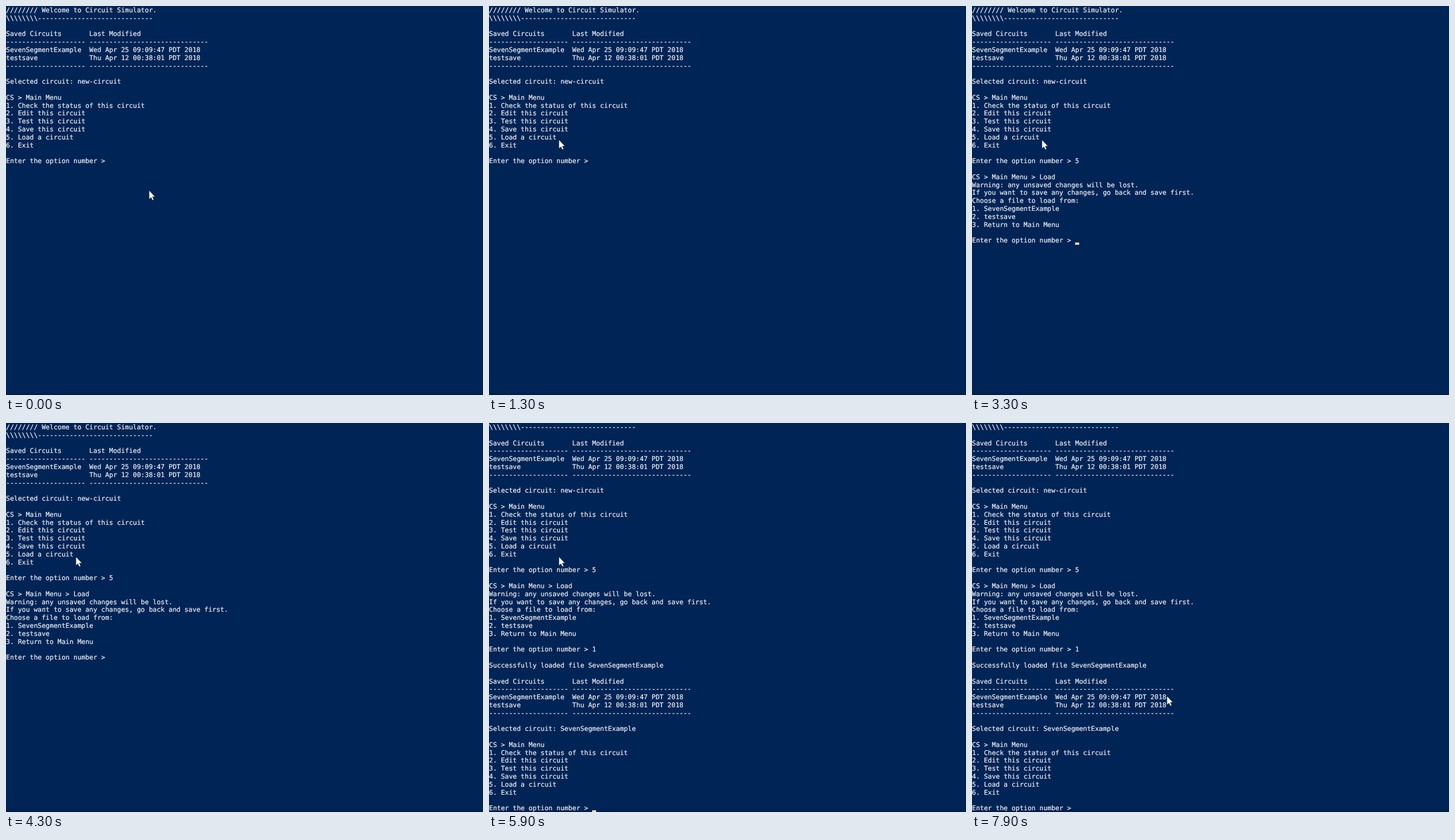
Animation, 828 px wide and 676 px high, one loop 8000 ms. Source, as an HTML page:

```html
<!DOCTYPE html>
<html lang="en">
<head>
<meta charset="utf-8">
<title>Circuit Simulator</title>
<style>
  html, body { margin: 0; width: 100%; height: 100%; overflow: hidden; background: #012456; }
  #stage { position: relative; width: 828px; height: 676px; overflow: hidden; background: #012456; }
  #edge { position: absolute; left: 0; bottom: 0; width: 100%; height: 3px; background: linear-gradient(#01214f, #011b42); }
  #screen {
    position: absolute; left: 0; top: 1px; margin: 0;
    font: 11.44px/13.79px "DejaVu Sans Mono", monospace;
    font-variant-ligatures: none; text-rendering: geometricPrecision;
    color: #f2f1f3; -webkit-text-stroke: .22px #f2f1f3; white-space: pre;
  }
  #caret { position: absolute; left: 0; top: 0; width: 7px; height: 4px; background: #fedba9; }
  #mouse { position: absolute; left: 0; top: 0; overflow: visible; }
</style>
</head>
<body>
<div id="stage">
  <div id="edge"></div>
  <pre id="screen"></pre>
  <div id="caret"></div>
  <svg id="mouse" width="12" height="19">
    <path d="M.5 .8V15.6L3.9 12.4 6.2 17.6 8.4 16.6 6.2 11.5H10.6Z" fill="#fff" stroke="#000" stroke-opacity=".6" stroke-width=".5"/>
  </svg>
</div>
<script>
const LOOP = 8000, COL = 6.885, ROW = 13.79, BLINK = 500, TICK = 100;
const $ = id => document.getElementById(id);
const output = $('screen'), caret = $('caret'), mouse = $('mouse');

const dash = n => '-'.repeat(n);
const rule = dash(20) + ' ' + dash(30);
const ask = 'Enter the option number > ';
const menu = name => `Saved Circuits       Last Modified
${rule}
SevenSegmentExample  Wed Apr 25 09:09:47 PDT 2018
testsave             Thu Apr 12 00:38:01 PDT 2018
${rule}

Selected circuit: ${name}

CS > Main Menu
1. Check the status of this circuit
2. Edit this circuit
3. Test this circuit
4. Save this circuit
5. Load a circuit
6. Exit

${ask}`;

const start = '/'.repeat(8) + ' Welcome to Circuit Simulator.\n' +
  '\\'.repeat(8) + dash(29) + '\n\n' + menu('new-circuit');
const load = `${start}5

CS > Main Menu > Load
Warning: any unsaved changes will be lost.
If you want to save any changes, go back and save first.
Choose a file to load from:
1. SevenSegmentExample
2. testsave
3. Return to Main Menu

${ask}`;
const loaded = load + '1\n\nSuccessfully loaded file SevenSegmentExample';
const full = loaded + '\n\n' + menu('SevenSegmentExample');
const scrolled = full.slice(full.indexOf('\n') + 1);

// hold: how long the caret stays lit before it blinks; 0 keeps it dark
const states = [
  { from: 0, text: start, hold: 0 },
  { from: 2200, text: start, hold: 500 },
  { from: 2800, text: start + '5', hold: 500 },
  { from: 3300, text: load, hold: 1000 },
  { from: 5200, text: load + '1', hold: 200 },
  { from: 5800, text: loaded, hold: 1000 },
  { from: 5900, text: scrolled, hold: 900 }
];

const home = [248, 320];
const glides = [
  { from: 300, till: 600, to: [228, 298] },
  { from: 700, till: 1300, to: [121, 232] },
  { from: 6400, till: 7000, to: [312, 430] },
  { from: 7000, till: 7400, to: [274, 428] },
  { from: 7700, till: 7900, to: [338, 474] }
];

const ease = u => u * u * (3 - 2 * u);

function mouseAt(t) {
  return glides.reduce((pos, g) => {
    const u = ease(Math.min(1, Math.max(0, (t - g.from) / (g.till - g.from))));
    return pos.map((p, i) => p + (g.to[i] - p) * u);
  }, home);
}

function isLit({ from, hold }, t) {
  const rest = t - from - hold;
  return hold > 0 && (rest < 0 || Math.floor(rest / BLINK) % 2 === 1);
}

const move = (el, x, y) => {
  el.style.transform = `translate(${Math.round(x)}px, ${Math.round(y)}px)`;
};

let shown;
function draw(t) {
  const state = states.findLast(s => s.from <= t);
  if (state !== shown) {
    shown = state;
    output.textContent = state.text;
    const lines = state.text.split('\n');
    move(caret, lines.at(-1).length * COL, lines.length * ROW - 3);
  }
  caret.style.visibility = isLit(state, t) ? 'visible' : 'hidden';
  move(mouse, ...mouseAt(t));
}

const t0 = performance.now();
function tick() {
  const t = (performance.now() - t0) % LOOP;
  draw(Math.floor(t / TICK) * TICK);
  requestAnimationFrame(tick);
}
tick();
</script>
</body>
</html>
```
